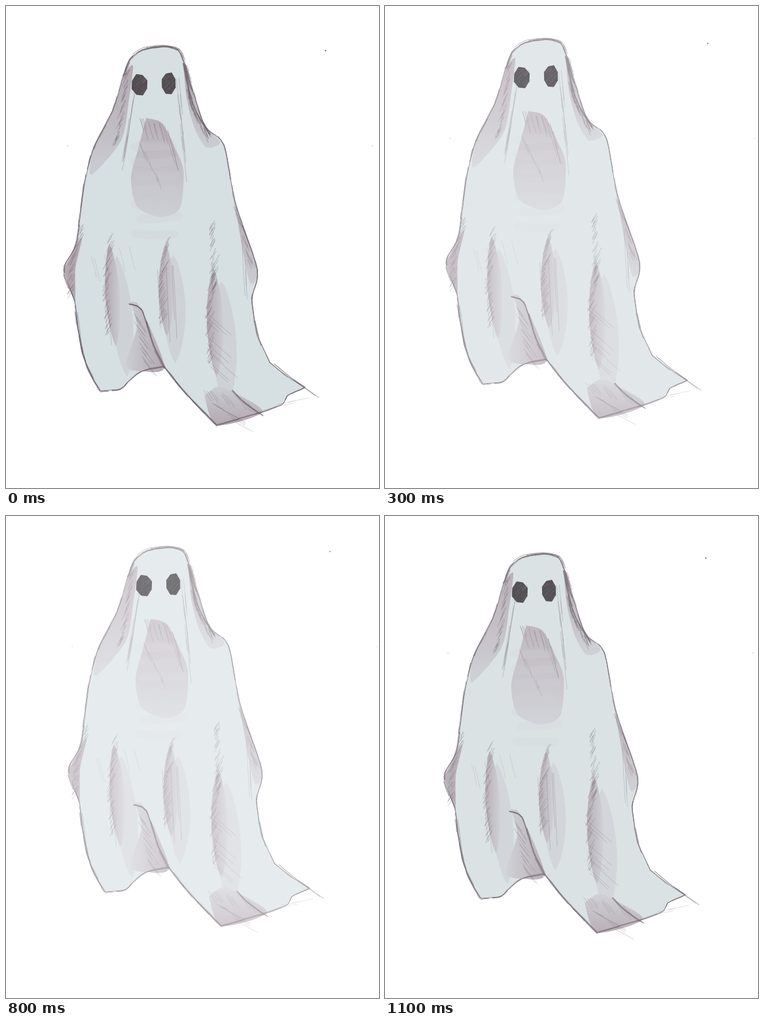
An HTML page that plays this animation: 570x735 px, repeating every 1200 ms.

```html
<!DOCTYPE html>
<html lang="en">
<head>
<meta charset="utf-8">
<title>Floating ghost</title>
<style>
  html, body { margin: 0; width: 100%; height: 100%; overflow: hidden; background: #fff; }
  svg { display: block; width: 100vw; height: 100vh; }
  path { stroke-linecap: round; stroke-linejoin: round; }
</style>
</head>
<body>
<svg viewBox="0 0 570 735" preserveAspectRatio="none">
  <defs id="defs"></defs>
  <g id="ghost">
    <g id="sheet"></g>
    <g id="eyes"></g>
  </g>
</svg>
<script>
const $ = id => document.getElementById(id);
const ghost = $('ghost'), sheet = $('sheet'), eyes = $('eyes');
const INK = '#6a6067', CLOTH = '#d6dfe2', MAUVE = '#b3a7b0', PALE = '#cbcdd3', EYE = '#4b4449', FLECK = '#857d83';

let seed = 11;
const rand = () => (seed = (seed * 16807) % 2147483647) / 2147483647;
const jitter = a => (rand() - 0.5) * 2 * a;
const mix = (a, b, t) => a + (b - a) * t;

function add(parent, tag, attrs) {
  const el = document.createElementNS('http://www.w3.org/2000/svg', tag);
  for (const k in attrs) el.setAttribute(k, attrs[k]);
  parent.append(el);
  return el;
}

const points = text => text.split(' ').map(p => p.split(',').map(Number));
const trace = pts => 'M' + pts.map(p => p.map(v => v.toFixed(1))).join('L');

// Dense samples of a Catmull-Rom curve
function spline(text, step = 8) {
  const pts = points(text), out = [], last = pts.length - 1;
  const at = i => pts[Math.max(0, Math.min(last, i))];
  for (let i = 0; i < last; i++) {
    const [a, b, c, d] = [at(i - 1), at(i), at(i + 1), at(i + 2)];
    const n = Math.ceil(Math.hypot(c[0] - b[0], c[1] - b[1]) / step);
    for (let j = 0; j < n; j++) {
      const t = j / n;
      out.push(b.map((v, k) => v + 0.4 * t * (1 - t) ** 2 * (c[k] - a[k])
        + t * t * (3 - 2 * t) * (c[k] - v) - 0.4 * t * t * (1 - t) * (d[k] - v)));
    }
  }
  return [...out, pts[last]];
}

function fill(pts, color, opacity = 1, parent = sheet) {
  add(parent, 'path', { d: trace(pts) + 'Z', fill: color, 'fill-opacity': opacity });
}
function line(pts, width = 0.6, opacity = 0.6, color = INK, parent = sheet) {
  add(parent, 'path', { d: trace(pts), fill: 'none', stroke: color, 'stroke-width': width, 'stroke-opacity': opacity });
}

// Gradient from mauve to pale along a direction in the shape's box
function shade(id, x1, y1, x2, y2) {
  const g = add($('defs'), 'linearGradient', { id, x1, y1, x2, y2 });
  [MAUVE, PALE].forEach((c, i) => add(g, 'stop', { offset: i, 'stop-color': c }));
  return `url(#${id})`;
}
const RIGHTWARD = shade('rightward', 0, 0, 1, 0);
const LEFTWARD = shade('leftward', 1, 0, 0, 0);
const DOWNWARD = shade('downward', 0, 0, 0, 1);
const UPWARD = shade('upward', 0, 1, 0, 0);

// A thin line overlaid by short loose strokes that wander and overlap
function sketch(pts, width = 1, passes = 2, spread = 1.3) {
  line(pts, width, 0.8);
  for (let p = 0; p < passes; p++) {
    for (let i = 0; i < pts.length - 2;) {
      const len = 4 + Math.floor(rand() * 9), dx = jitter(spread), dy = jitter(spread);
      const part = pts.slice(i, i + len).map(([x, y]) => [x + dx + jitter(0.4), y + dy + jitter(0.4)]);
      if (part.length > 1) line(part, 0.5 + rand() * 0.7, 0.75);
      i += len - 1 + Math.floor(rand() * 4);
    }
  }
}

// Parallel strokes of random length spread along a guide
function hatch(guide, count, dx, dy, opacity = 0.6) {
  const pts = spline(guide);
  for (let i = 0; i < count; i++) {
    const [x, y] = pts[Math.floor((i + rand()) / count * pts.length)].map(v => v + jitter(2.5));
    const s = 0.4 + rand() * 0.8;
    line([[x, y], [x + dx * s / 2 + jitter(0.8), y + dy * s / 2], [x + dx * s, y + dy * s]], 0.6, opacity);
  }
}

// Pointed leaf hanging from (x, y)
function leaf(x, y, w, h, lean, color, opacity) {
  const pts = [];
  for (let i = 0; i <= 40; i++) {
    const t = i < 20 ? i / 20 : 2 - i / 20, side = i < 20 ? 1 : -1;
    pts.push([x + lean * t + side * w / 2 * Math.sin(Math.PI * t) ** 0.7, y + h * t]);
  }
  fill(pts, color, opacity);
}

// Cloth fold: pale wash, darker core, hatching on its left side
function fold(x, y, w, h, lean) {
  leaf(x + w * 0.5, y + h * 0.1, w * 1.5, h, lean * 1.6, PALE, 0.7);
  leaf(x, y, w, h * 0.85, lean, RIGHTWARD, 1);
  const left = x - w * 0.4;
  hatch(`${x - 2},${y} ${left},${y + h * 0.35} ${left + lean * 0.5},${y + h * 0.75}`, 32, 9, -16);
}

// Body contour
const crown = spline('180,106 190,81 208,67 240,62 263,67 272,85');
const right = spline('272,85 285,128 304,183 333,212 350,298 384,402 376,447 385,502 403,543');
const tail = spline('403,543 426,562 456,582');
const hem = spline('456,582 430,594 424,606 392,619 322,639');
const under = spline('322,639 275,591 242,550');
const cave = spline('242,550 208,557 186,574 176,584 144,587');
const left = spline('144,587 124,550 110,490 105,450 88,402 107,362 120,272 134,217 163,160 180,106');
const body = [crown, right, tail, hem, under, cave, left];
fill(body.flat(), CLOTH);

// Washes
fill(spline('182,104 194,90 188,142 176,205 130,258 134,217 163,160 182,104'), DOWNWARD);
fill(spline('271,86 286,130 305,183 328,208 306,216 288,186 276,140 271,86'), DOWNWARD);
fill(spline('214,171 238,178 256,212 271,250 266,308 236,322 200,306 191,262 203,214 214,171'), DOWNWARD, 0.85);
fill(spline('88,402 116,352 106,400 105,450 88,402'), MAUVE);
fill(spline('350,303 384,402 374,424 364,385 350,303'), DOWNWARD);
for (let i = 0; i < 7; i++) {
  const y = 215 + i * 22, x = 202 + jitter(6);
  line([[x, y], [x + 28, y + jitter(5)], [x + 58, y + jitter(5)]], 13, 0.22, PALE);
}

fold(158, 362, 22, 185, 10);
fold(244, 363, 23, 165, 2);
fold(317, 400, 25, 195, 5);
fill(spline('190,451 206,460 242,550 208,557 183,548 200,490 190,451'), LEFTWARD);
fill(spline('303,594 324,580 348,589 392,619 322,639 303,594'), UPWARD);

// Contour strokes
body.forEach(part => sketch(part));
sketch(crown, 0.8, 3, 2.2);
sketch(under, 1.4, 2, 1.6);
sketch(spline('272,88 286,150 312,197'), 1, 4, 2.5);
sketch(spline('107,468 116,528 133,568'), 1, 3, 2.2);
sketch(spline('188,454 207,463 225,518 243,552'), 1.1, 3, 1.5);
sketch(spline('346,586 364,604 392,624'), 1.2, 2, 1.4);
sketch(spline('411,546 440,570 478,597'), 0.8, 1, 1.5);

// Shading strokes
hatch('187,92 184,130 172,200', 34, -8, 16);
hatch('274,90 280,140 303,190', 50, 6, 15, 0.7);
hatch('205,172 238,180', 10, 8, 28, 0.5);
hatch('202,205 232,260', 8, 9, 24, 0.35);
hatch('120,335 104,385 103,430', 30, -9, 14);
hatch('313,340 316,440', 34, 6, -13);
hatch('305,465 311,550', 9, 38, 34, 0.45);
hatch('195,468 210,540', 16, 20, 27, 0.5);
hatch('312,600 380,620', 11, -14, -20, 0.45);
hatch('315,605 350,632', 7, 32, 17, 0.5);
hatch('350,305 372,385', 18, 7, 16, 0.5);
hatch('125,385 190,365', 5, 8, 32, 0.25);

// Long drape lines and wisps
hatch('197,125 185,205', 8, -12, 70, 0.45);
hatch('262,105 270,200', 9, 8, 75, 0.45);
hatch('238,180 252,200', 4, 16, 60, 0.45);
hatch('232,400 256,395', 4, 5, 100, 0.45);
hatch('148,430 156,470', 3, 8, 75, 0.4);
hatch('361,350 364,400', 3, 5, 90, 0.4);
hatch('412,610 430,603', 3, 30, -6, 0.35);

// Stray dots
line([[488, 68], [488.5, 68.3]], 1.6, 1, EYE);
[94, 560].forEach(x => line([[x, 213], [x + 0.5, 213]], 1, 0.6));

// Eyes: uneven octagon with slanted scribble
function eye(cx, cy, rx, ry) {
  const ring = Array.from({ length: 8 }, (_, i) => {
    const a = (i + 0.5) * Math.PI / 4, r = 1 + jitter(0.06);
    return [cx + rx * r * Math.cos(a), cy + ry * r * Math.sin(a)];
  });
  fill(ring, EYE, 0.95, eyes);
  line([...ring, ring[0]], 1, 0.8, EYE, eyes);
  for (let i = 0; i < 16; i++) {
    const x = cx + jitter(rx * 0.7), y = cy + jitter(ry * 0.7), s = 1.5 + rand() * 2.5;
    line([[x - s, y + s], [x + s, y - s]], 0.6, 0.6, FLECK, eyes);
  }
}
eye(204, 120, 12.5, 16.5);
eye(248.5, 118, 11, 16.5);

// Rise and fade in six steps, then return
const STEP = 100, HALF = 6;
function draw(now) {
  const step = Math.floor(now / STEP) % (HALF * 2);
  const k = HALF - Math.abs(HALF - step);
  const alpha = mix(1, 0.4, k / HALF);
  ghost.setAttribute('transform', `translate(${Math.round(k * 1.75)} ${Math.round(k * -3.6)})`);
  sheet.setAttribute('opacity', alpha);
  eyes.setAttribute('opacity', 1 - (1 - alpha) ** 1.6);
}
function tick() {
  draw(performance.now());
  requestAnimationFrame(tick);
}
tick();
</script>
</body>
</html>
```
